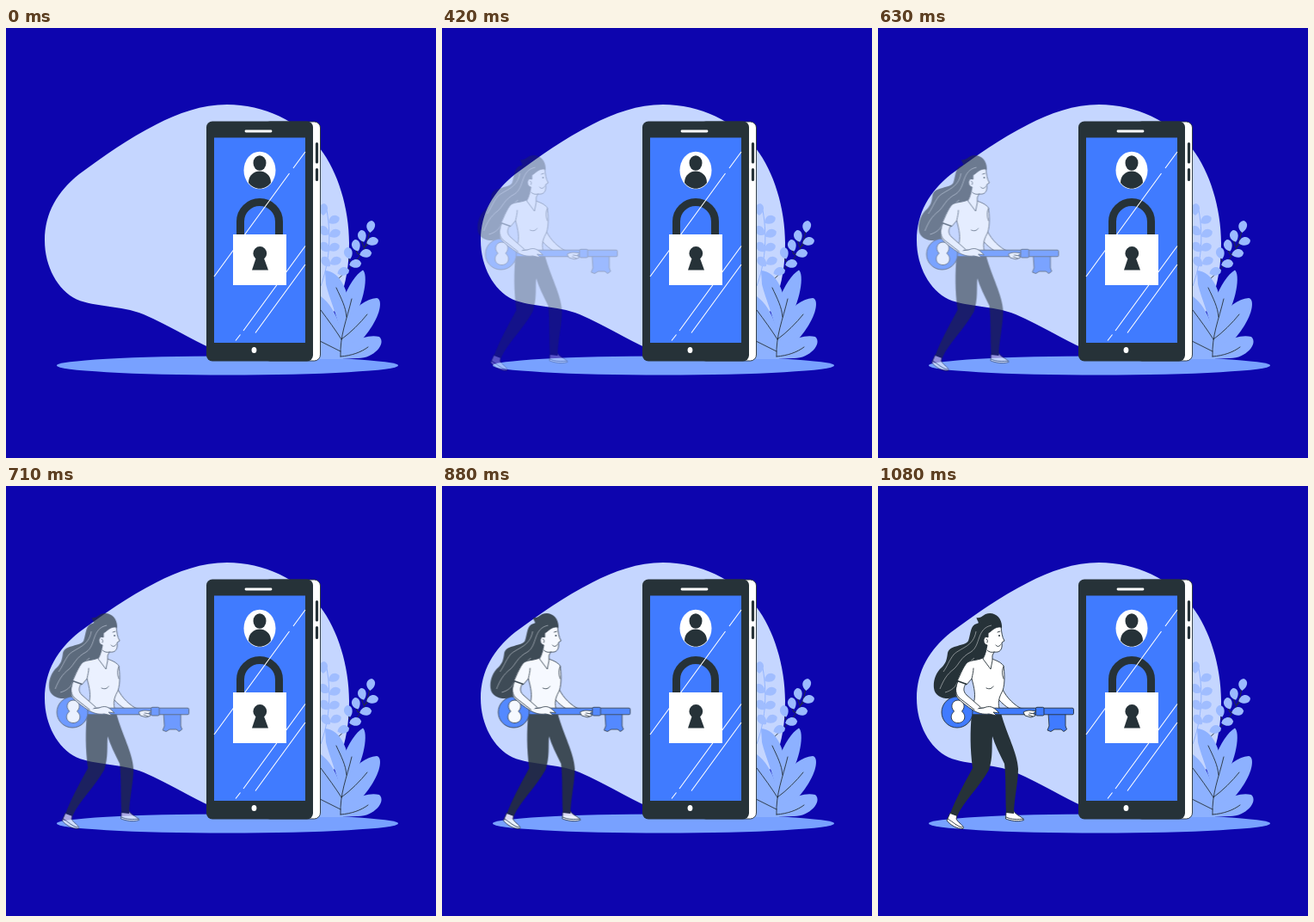
An HTML page without scripts that plays this animation: 500x500 px, repeating every 1120 ms.

```html
<!DOCTYPE html>
<html lang="en">
<head>
<meta charset="utf-8">
<title>Phone lock and key</title>
<style>
html, body { margin: 0; width: 100%; height: 100%; overflow: hidden; background: #0d05ae; }
svg { display: block; width: 100vw; height: 100vh; }
.ink { fill: #263238; }
.blue { fill: #407bff; }
.white { fill: #fff; }
.line { fill: none; stroke: #263238; stroke-width: .9; stroke-linecap: round; stroke-linejoin: round; }
.edge { stroke: #263238; stroke-width: .9; stroke-linejoin: round; }
.shine { fill: none; stroke: #fff; stroke-width: 1.1; }
.strand { fill: none; stroke: #fff; stroke-width: .6; opacity: .75; }

/* the figure walks in and fades up in 40 ms steps */
.walker { animation: walk 1120ms infinite; }
@keyframes walk {
  0% { opacity: 0; transform: translateX(-31px); animation-timing-function: step-end; }
  11.607% { opacity: .03; transform: translateX(-30.5px); animation-timing-function: steps(4, end); }
  25.893% { opacity: .16; transform: translateX(-26.8px); animation-timing-function: steps(5, end); }
  44.643% { opacity: .4; transform: translateX(-21.4px); animation-timing-function: steps(3, end); }
  56.25% { opacity: .56; transform: translateX(-17.5px); animation-timing-function: steps(4, end); }
  70.536% { opacity: .75; transform: translateX(-12px); animation-timing-function: steps(2, end); }
  78.571% { opacity: .85; transform: translateX(-8.6px); animation-timing-function: steps(5, end); }
  96.429%, 100% { opacity: 1; transform: none; }
}
</style>
</head>
<body>
<svg viewBox="0 0 500 500">
  <defs>
    <path id="leaf" d="M0 7C-7 3-6-6 1-7C7-5 6 3 0 7Z"/>
  </defs>

  <path fill="#c5d6ff" d="M257 89C300 89 340 108 365 140C386 167 399 210 399 250C399 300 385 340 350 365C315 385 270 385 240 373C215 362 190 346 160 333C132 322 105 325 82 315.500C60 305 45 277 45 247C45 215 60 190 85 170C115 148 140 130 175 112C200 99 228 89 257 89Z"/>
  <ellipse cx="257.5" cy="392.5" rx="198.5" ry="11" fill="#78a1ff"/>

  <!-- plants -->
  <g fill="#a0bdff">
    <path d="M366 300C375 275 379 245 373 212" fill="none" stroke="#8cafff" stroke-width=".9"/>
    <use href="#leaf" x="369" y="211"/>
    <use href="#leaf" transform="translate(381 223) rotate(60)"/>
    <use href="#leaf" transform="translate(370 236) rotate(-55)"/>
    <use href="#leaf" transform="translate(382 239) rotate(62)"/>
    <use href="#leaf" transform="translate(371 255) rotate(-50)"/>
    <use href="#leaf" transform="translate(381 255) rotate(64)"/>
    <use href="#leaf" transform="translate(372 272) rotate(-45)"/>
    <use href="#leaf" transform="translate(383 271) rotate(60)"/>
  </g>
  <g fill="#9bbaff">
    <path class="line" d="M380 298C400 278 420 264 423 234M413 246L416 255L427 248M406 256L409 263L418 262M398 266L400 272L406 274"/>
    <use href="#leaf" transform="translate(424 231) rotate(5)"/>
    <use href="#leaf" transform="translate(414 242) rotate(-18)"/>
    <use href="#leaf" transform="translate(426 248) rotate(72)"/>
    <use href="#leaf" transform="translate(407 253) rotate(-22)"/>
    <use href="#leaf" transform="translate(418 262) rotate(75)"/>
    <use href="#leaf" transform="translate(398 262) rotate(-20)"/>
    <use href="#leaf" transform="translate(406 274) rotate(78)"/>
    <use href="#leaf" transform="translate(392 283) rotate(70)"/>
  </g>
  <g fill="#8db1ff">
    <path d="M371 282C389 283 402 308 399 343L391 364C386 335 377 318 372 298Z"/>
    <path d="M391 364C378 336 399 291 415 281.500C421 286 418 318 400 345Z"/>
    <path d="M388 384C382 352 406 316 431 314C442 316 431 356 388 384Z"/>
    <path d="M360 308C378 318 394 343 392 385H360Z"/>
    <path d="M386 385C392 367 418 355 434 359C443 367 427 385 408 384Z"/>
  </g>
  <path class="line" d="M389 382C388 358 396 340 402 315M384 302C390 315 395 324 396 336M390 362C401 354 412 343 420 333M366 328C375 340 383 351 390 362M365 364L389 376M389 382C402 381 413 377 421 371"/>

  <!-- phone -->
  <rect class="white edge" x="300" y="109" width="65.5" height="278" rx="7"/>
  <rect class="ink" x="233" y="108.500" width="124" height="279" rx="7"/>
  <rect class="blue" x="242" y="127.500" width="106" height="238.500"/>
  <path d="M279 120H308" stroke="#fff" stroke-width="2.800" stroke-linecap="round"/>
  <ellipse class="white" cx="288.500" cy="374.500" rx="2.900" ry="3.500"/>
  <path d="M361.500 134.500V156M361.500 164.500V176.500" stroke="#263238" stroke-width="3.200" stroke-linecap="round"/>

  <ellipse class="white" cx="295" cy="165.500" rx="18.500" ry="21.800"/>
  <ellipse class="ink" cx="295" cy="157" rx="7.500" ry="8.800"/>
  <path class="ink" d="M282 180C282 162 308 162 308 180C301 189 289 189 282 180Z"/>

  <path d="M272.500 242V225A22.500 22.500 0 0 1 317.500 225V242" fill="none" stroke="#263238" stroke-width="9"/>
  <path class="shine" d="M242 289L329.500 169M334 163L348 144M267 363.500L272.500 356.500M276 352L348 253.500M290 354.500L348 275"/>
  <rect class="white" x="264" y="240" width="62" height="59"/>
  <circle class="ink" cx="295.300" cy="262" r="7.900"/>
  <path class="ink" d="M291.500 265L286 281.500H305L299 265Z"/>

  <g class="walker">
    <!-- hair -->
    <path class="ink" d="M144 165C145 153 135 145 125 149C121 151 120 154 114.500 153C115 157 119 159 115 160C107 162 108 172 105 180C101 187 84 184 81 194C80 202 79 206 74 211C67 217 64 227 65 235C66 246 80 249 88 246C98 243 97 232 102 222C112 208 124 205 126 190L130 176Z"/>
    <path class="strand" d="M132 162C114 166 120 185 108 193C96 199 94 208 88 213C80 219 76 226 72 236M114 169C111 187 96 188 88 196C82 204 81 209 76 216M112 200C101 208 96 216 93 226C91 234 85 238 78 240"/>

    <!-- legs -->
    <path class="white edge" d="M84 380L92 383L91 387C93 392 101 395 99 398.500C92 399 84 394 80 389Z"/>
    <path class="white edge" d="M149 379L158 378C160 383 169 385 169.500 388.500C162 391 154 389 148.500 387Z"/>
    <path class="line" d="M81 387C88 391 92 396 98 397M149 385C155 388 163 388 169 387"/>
    <path class="ink" d="M109 264H143C150 290 162 310 163 329C163 345 158 365 158 381L149 380C148 360 149 340 147 323C141 311 136 301 133 291C132 303 134 315 129 330C118 350 100 366 92 384L84 381C90 365 98 350 110 328C107 305 107 285 109 264Z"/>

    <!-- far arm and torso -->
    <path class="white edge" d="M143 232C147 243 155 252 165 258L176 261L172 266L160 263C150 258 141 251 137 243Z"/>
    <path class="white edge" d="M124 199C117 203 109 202 104 205C99 210 96 219 92 227L103 231L109 224C112 235 114 244 111 253L109 265H143C140 256 138 250 145 238C148 229 147 217 146 209C142 204 137 203 133 201Z"/>
    <path class="line" d="M109 224C110 219 111 216 111 212M126 235C130 237 133 235 134 233M146 210C144 214 144 219 146 224"/>

    <!-- head -->
    <path class="white edge" d="M128 171C132 169 136 163 143 164C144 171 144 175 147 180L144 182C145 190 142 194 135 193L133 197V203L131 213L122 201C125 196 126 190 127 185C121 184 122 173 128 176Z"/>
    <path class="line" d="M137 185C139 188 142 186 143 184M139 170L142 169M126 178C127 178 128 180 127 182M127 191C129 193 132 194 135 193"/>
    <circle class="ink" cx="141" cy="174" r="1"/>

    <!-- key -->
    <g class="blue edge">
      <path d="M198 264H218V279L219.500 283L216 285.500L213 283H205L201 285.500L197 284L199 279Z"/>
      <rect x="108" y="258.200" width="119.500" height="7.600" rx="1.500"/>
      <rect x="183.500" y="257.300" width="9.500" height="9.700" rx="1.500"/>
      <circle cx="92" cy="263" r="18"/>
    </g>
    <path class="white edge" d="M88.500 262C83 256 87 249 93 249C99 249 103 256 97.500 262C104 268 100 275.500 93 275.500C86 275.500 82 268 88.500 262Z"/>

    <!-- near arm and hands -->
    <path class="white edge" d="M94 227C91 234 90 240 94 244C100 250 107 255 114 259L123 258C130 255 133 257 137 260L141 264L134 263L138 267L129 265C122 266 116 264 111 261C103 256 97 251 92 246C89 240 91 233 94 227Z"/>
    <path class="white" d="M93 227L102 230C99 235 99 239 103 243L119 256L114 261L94 246C89 240 91 234 93 227Z"/>
    <path class="line" d="M102 230C99 235 99 239 103 243L119 257M93 227C90 234 89 240 94 246L112 260"/>
    <path d="M92 226.500L103 230.500" stroke="#263238" stroke-width="1.500"/>
    <path class="white edge" d="M169 263C174 260 179 261 184 262L181 264L183 267L178 269L171 267Z"/>
    <path class="line" d="M176 264L182 265M175 266L180 268"/>
  </g>
</svg>
</body>
</html>
```
